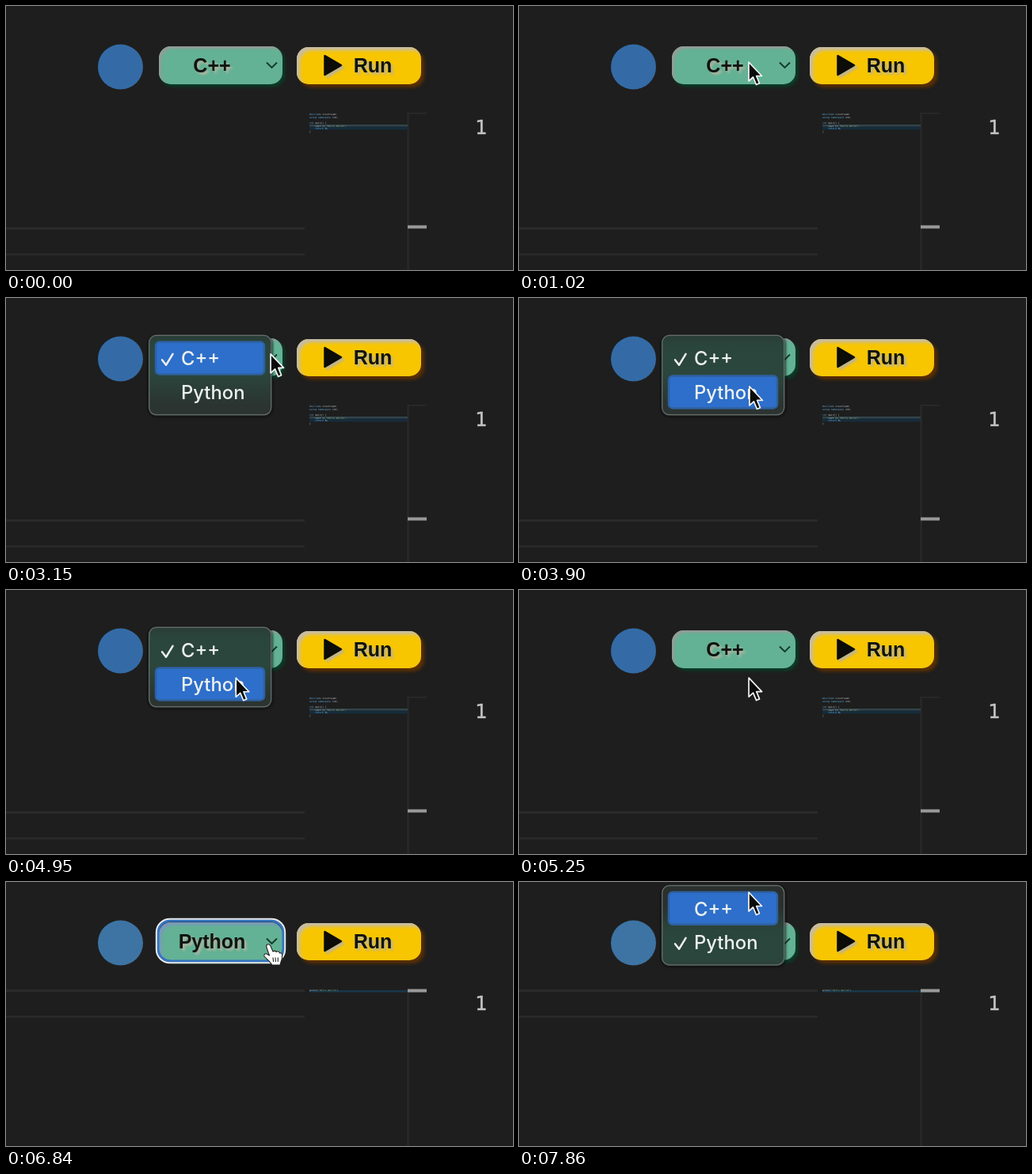
An HTML page for the animation above (8000 ms loop, 640 px wide and 334 px high).

```html
<!DOCTYPE html>
<html lang="en">
<head>
<meta charset="utf-8">
<title>Language picker</title>
<style>
  html, body { margin: 0; width: 100%; height: 100%; overflow: hidden; background: #1e1e1e; }
  svg { display: block; width: 100%; height: 100%; }
  text { white-space: pre; }
  foreignObject { overflow: visible; }
  .button { box-sizing: border-box; height: 100%; border-radius: 15px; }
  .go { background: #f7c600; box-shadow: 4px 4px 4px #5e3000, inset 4px 4px 4px #c4bcb0; }
  .pick { background: #63b295; box-shadow: 3px 3px 4px #08402a, inset 3px 3px 3px #959b98; }
  .focused { box-shadow: 3px 3px 4px #08402a, inset 3px 3px 4px #7f93c4; }
  .label { font: bold 25px "Liberation Sans", Arial, sans-serif; fill: #101411; text-anchor: middle; }
  .raised { filter: drop-shadow(3px 3px 1.3px rgba(185, 178, 160, .85)); }
  .item { font: 500 23.8px Inter, sans-serif; fill: #eef1f0; }
  .mini { font: 3px "DejaVu Sans Mono", monospace; fill: #c4cbce; }
  .blue { fill: #62b0e4; }
  .green { fill: #8fae7c; }
  .line-number { font: 25px "DejaVu Sans Mono", monospace; fill: #c4c4c4; stroke: #c4c4c4; stroke-width: .4px; text-anchor: middle; }
  .rule { fill: #2a2a2a; }
  .mark { fill: #999; }
</style>
</head>
<body>
<svg viewBox="0 0 640 334" preserveAspectRatio="none">
  <defs>
    <linearGradient id="glass" gradientUnits="userSpaceOnUse" x1="0" y1="0" x2="0" y2="150">
      <stop offset=".2" stop-color="#2a302e"/>
      <stop offset=".4" stop-color="#2a453c"/>
      <stop offset=".64" stop-color="#2b463d"/>
      <stop offset=".9" stop-color="#2b3431"/>
    </linearGradient>
    <filter id="soft" x="-10%" y="-10%" width="125%" height="130%">
      <feGaussianBlur stdDeviation="1.5"/>
    </filter>
  </defs>
  <rect width="640" height="334" fill="#1e1e1e"/>

  <rect class="rule" x="506.5" y="135" width="2" height="199"/>
  <rect class="rule" x="508" y="135" width="23" height="1.5"/>
  <text class="line-number" x="599.5" y="162">1</text>

  <g id="cppEditor">
    <rect class="rule" y="280" width="377" height="3"/>
    <rect class="rule" y="313" width="377" height="2.5"/>
    <rect class="mark" x="507" y="277.5" width="24" height="4"/>
    <rect x="383" y="150" width="124" height="2.5" fill="#30454c"/>
    <rect x="383" y="153" width="124" height="3.5" fill="#152c3c"/>
    <g class="mini">
      <text x="383" y="138.4"><tspan class="blue">#include</tspan> &lt;iostream&gt;</text>
      <text x="383" y="142"><tspan class="blue">using namespace</tspan> std;</text>
      <text x="383" y="149"><tspan class="blue">int</tspan> main() {</text>
      <text x="390" y="152.6">cout &lt;&lt; <tspan class="green">"Hello World"</tspan>;</text>
      <text x="390" y="156"><tspan class="blue">return</tspan> 0;</text>
      <text x="383" y="159.5">}</text>
    </g>
  </g>
  <g id="pyEditor">
    <rect class="rule" y="136" width="377" height="3"/>
    <rect class="rule" y="169" width="377" height="2.5"/>
    <rect class="mark" x="507" y="135.5" width="24" height="4"/>
    <rect x="383" y="137" width="124" height="2.5" fill="#18384b"/>
    <text class="mini" x="383" y="138.4">print(<tspan class="green">"Hello World"</tspan>)</text>
  </g>

  <circle id="badge" cx="144.5" cy="77" r="28.5"/>

  <foreignObject x="192.5" y="50.5" width="156.5" height="48.5"><div id="select" class="button pick"></div></foreignObject>
  <g id="ring" fill="none">
    <rect x="192" y="49" width="158" height="51" rx="15.5" stroke="#3576c2" stroke-width="3"/>
    <rect x="189.8" y="46.8" width="162.4" height="55.4" rx="17" stroke="#e9ecf0" stroke-width="2"/>
  </g>
  <text id="choice" class="label raised" x="260" y="84"></text>
  <path d="M329 71.5l6.5 6.5 6.5-6.5" fill="none" stroke="#15382a" stroke-width="1.9"/>

  <foreignObject x="367" y="52" width="156.5" height="47"><div class="button go"></div></foreignObject>
  <path class="raised" d="M402.5 63v24l20.5-12z" fill="#0c0c08" stroke="#0c0c08" stroke-width="2.5" stroke-linejoin="round"/>
  <text class="label raised" x="463" y="84">Run</text>

  <g id="menu">
    <rect id="panelShade" x="179" width="158" height="103" rx="11" fill="#0a0a0a" opacity=".7" filter="url(#soft)"/>
    <rect id="panel" x="180.7" width="154" height="100.5" rx="9" fill="url(#glass)" stroke="#626b67" stroke-width="1.4"/>
    <rect id="highlight" x="189" width="137" height="41" rx="5" fill="#2d6fca" stroke="#2f619f" stroke-width="2.5"/>
    <path id="tick" d="M197 1l5 6.5 8.5-14" fill="none" stroke="#eef1f0" stroke-width="2.5" stroke-linecap="round" stroke-linejoin="round"/>
    <text id="item0" class="item" x="221">C++</text>
    <text id="item1" class="item" x="221">Python</text>
  </g>

  <g id="cursor">
    <path id="arrow" d="M1 1V25L6.5 20 10.5 29.5 14.5 27.8 10.7 18.5H17.5Z" fill="#0b0b0b" stroke="#f5f5f5" stroke-width="1.7" stroke-linejoin="round"/>
    <g id="hand" stroke="#202020" stroke-width="1.1" stroke-linejoin="round">
      <path fill="#fff" d="M-4 3C-5.5-1-1-3 1 1L4 8C6 6.5 7.5 7 8 8.5 10.5 7 12 8 12.5 10 15 9 16 11 15.5 14 16 18 13.5 21 13 25H3C1 21-4 17.5-7 14-8 11-5 10-3 11.5L-.5 13Z"/>
      <path fill="none" d="M4 15.5l.6 5.5M7 15.5l.4 5.5M10.3 15.5v5.5"/>
    </g>
  </g>
</svg>
<script>
const LOOP = 8000;
const ITEM_STEP = 42.8;
const SWITCH_AT = 5450;
const MENUS = [[3000, 5100], [7120, LOOP]];

// time, x, y of the pointer tip
const PATH = [
  [30, 289, 336], [720, 289, 70], [1100, 289, 70], [1900, 334, 69],
  [3100, 334, 69], [3700, 290, 111], [5600, 289, 110], [6350, 333, 80],
  [7200, 333, 80], [7750, 289, 12], [LOOP, 289, 12]
];

const el = id => document.getElementById(id);
const show = (id, on) => el(id).setAttribute("visibility", on ? "inherit" : "hidden");
const set = (id, attr, value) => el(id).setAttribute(attr, value);
const ease = u => u * u * (3 - 2 * u);

function pointerAt(t) {
  if (t <= PATH[0][0]) return PATH[0].slice(1);
  const next = PATH.findIndex(step => step[0] >= t);
  const [t0, x0, y0] = PATH[next - 1];
  const [t1, x1, y1] = PATH[next];
  const u = ease((t - t0) / (t1 - t0));
  return [x0 + (x1 - x0) * u, y0 + (y1 - y0) * u];
}

function drawMenu(selected, pointerY) {
  const top = 47.3 - selected * ITEM_STEP;
  const hovered = pointerY > top + 50 ? 1 : 0;
  set("panelShade", "y", top);
  set("panel", "y", top);
  set("highlight", "y", top + 8.3 + hovered * ITEM_STEP);
  set("tick", "transform", `translate(0 ${top + 30 + selected * ITEM_STEP})`);
  [0, 1].forEach(i => set("item" + i, "y", top + 38 + i * ITEM_STEP));
}

function draw(t) {
  const python = t >= SWITCH_AT;
  const open = MENUS.some(([from, to]) => t >= from && t < to);
  const focused = python && !open;
  const [x, y] = pointerAt(t);
  const overSelect = x > 193 && x < 349 && y > 51 && y < 99;
  const hand = !open && overSelect && t > 1200;

  show("cppEditor", !python);
  show("pyEditor", python);
  set("badge", "fill", python ? "#3d74a3" : "#346ba6");
  el("select").classList.toggle("focused", focused);
  show("ring", focused);
  el("choice").textContent = python ? "Python" : "C++";

  show("menu", open);
  if (open) drawMenu(python ? 1 : 0, y);

  set("cursor", "transform", `translate(${x} ${y})`);
  show("arrow", !hand);
  show("hand", hand);
}

const start = performance.now();
function tick() {
  draw((performance.now() - start) % LOOP);
  requestAnimationFrame(tick);
}
tick();
</script>
</body>
</html>
```
